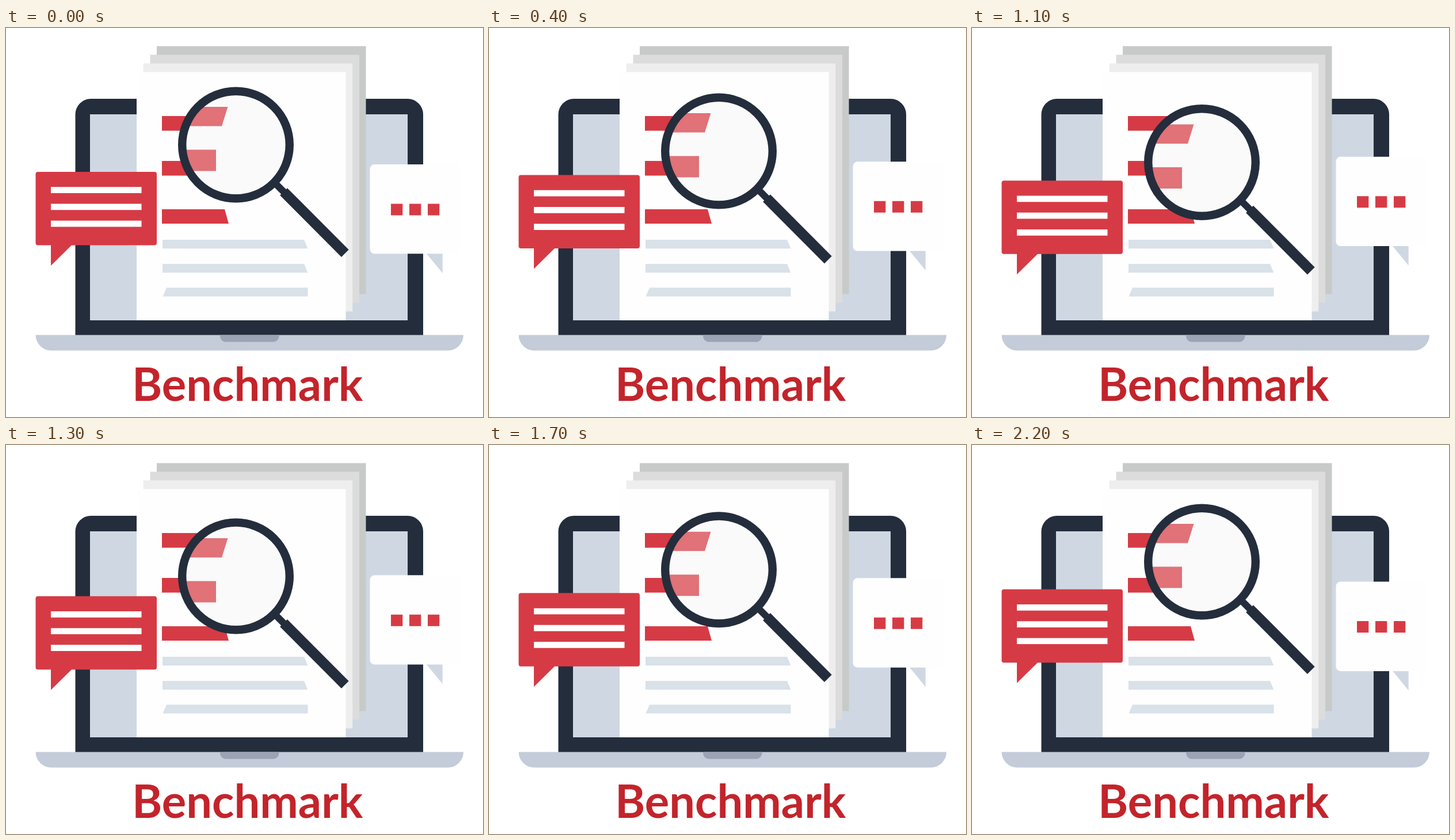
Recreate the animation shown at these times as an HTML page. Size 829 by 676 pixels, loop 2300 ms.

```html
<!DOCTYPE html>
<html lang="en">
<head>
<meta charset="utf-8">
<title>Benchmark</title>
<style>
  html, body { margin: 0; width: 100%; height: 100%; overflow: hidden; background: #fff; }
  svg { display: block; width: 829px; height: 676px; }
  .dark { fill: #242d3c; }
  .screen { fill: #cfd8e2; }
  .red { fill: #d63b45; }
  .pink { fill: #e07278; }
  .paper { fill: #fefefe; }
  .line { fill: #d9e1e9; }
  .handle { stroke: #242d3c; fill: none; }
  text { font: 700 79.5px Lato, "Open Sans", sans-serif; fill: #c3242b; }
</style>
</head>
<body>
<svg viewBox="0 0 829 676">
  <defs>
    <clipPath id="glass"><circle cx="399.5" cy="203" r="90"/></clipPath>
  </defs>

  <!-- laptop -->
  <path class="dark" d="M120.5 534V150a27 27 0 0 1 27-27H698a27 27 0 0 1 27 27V534z"/>
  <rect class="screen" x="146" y="150" width="552" height="358"/>
  <path fill="#c4cbd9" d="M51.5 533.5H795a27 27 0 0 1-27 27H78.500a27 27 0 0 1-27-27z"/>
  <path fill="#9ba3b4" d="M372 533.500H474.500V535.500a10 10 0 0 1-10 10H382a10 10 0 0 1-10-10z"/>

  <!-- pages -->
  <rect x="262" y="31.500" width="363.500" height="431" fill="#c8cac9"/>
  <rect x="250.500" y="46.500" width="363.500" height="431" fill="#dcdcdc"/>
  <rect x="238.700" y="61.500" width="363.500" height="431" fill="#eee"/>
  <rect class="paper" x="227" y="76.500" width="363.500" height="431.500"/>
  <path class="red" d="M271 153H350V178.500H271zM271 231H330V256.500H271zM271 315H380L387 340H271z"/>
  <path class="line" d="M272 368H518L524.500 383.300H272zM272 410H518L524.500 425.300H272zM279 451.300H524.500V466.500H272.500z"/>

  <!-- magnifier -->
  <g id="lens">
    <path class="handle" stroke-width="12" d="M464 266L484 286"/>
    <path class="handle" stroke-width="18" d="M482.500 284.500L589.300 391.700"/>
    <circle cx="399.500" cy="203" r="90" fill="#fafafa"/>
    <path class="pink" clip-path="url(#glass)" d="M300 137H385.500L375 170.500H300zM300 211.500H365V248.500H300z"/>
    <circle cx="399.500" cy="203" r="93.300" fill="none" stroke="#242d3c" stroke-width="14.400"/>
  </g>

  <!-- speech bubbles -->
  <g id="note">
    <rect class="red" x="51.500" y="250" width="210.500" height="127.500" rx="4"/>
    <path class="red" d="M78 376V413L115.500 376z"/>
    <path fill="#fff" d="M78 276.300H235.500V287H78zM78 305.500H235.500V316.200H78zM78 334.700H235.500V345.400H78z"/>
  </g>
  <g id="reply">
    <path class="screen" d="M730 391H758.700V426z"/>
    <rect class="paper" x="632.500" y="237" width="157.500" height="155.300" rx="8"/>
    <path class="red" d="M669 305.500h20.300v20h-20.300zM701 305.500h20.300v20h-20.300zM733 305.500h20.300v20h-20.300z"/>
  </g>

  <text x="219" y="647.500">Benchmark</text>
</svg>
<script>
  const STEP = 100, COUNT = 23, TURN = 11;

  // Vertical travel: offset at the turn and at the last step.
  const parts = [
    ["lens", 30.5, 0],
    ["note", 15.3, 0.7],
    ["reply", -13.2, 0.6],
  ].map(([id, peak, end]) => ({ el: document.getElementById(id), peak, end }));

  const offset = (step, { peak, end }) =>
    step <= TURN ? peak * step / TURN : peak + (end - peak) * (step - TURN) / TURN;

  const start = performance.now();

  function draw() {
    const step = Math.floor((performance.now() - start) / STEP) % COUNT;
    for (const part of parts) {
      part.el.setAttribute("transform", `translate(0 ${offset(step, part).toFixed(2)})`);
    }
    requestAnimationFrame(draw);
  }
  draw();
</script>
</body>
</html>
```
